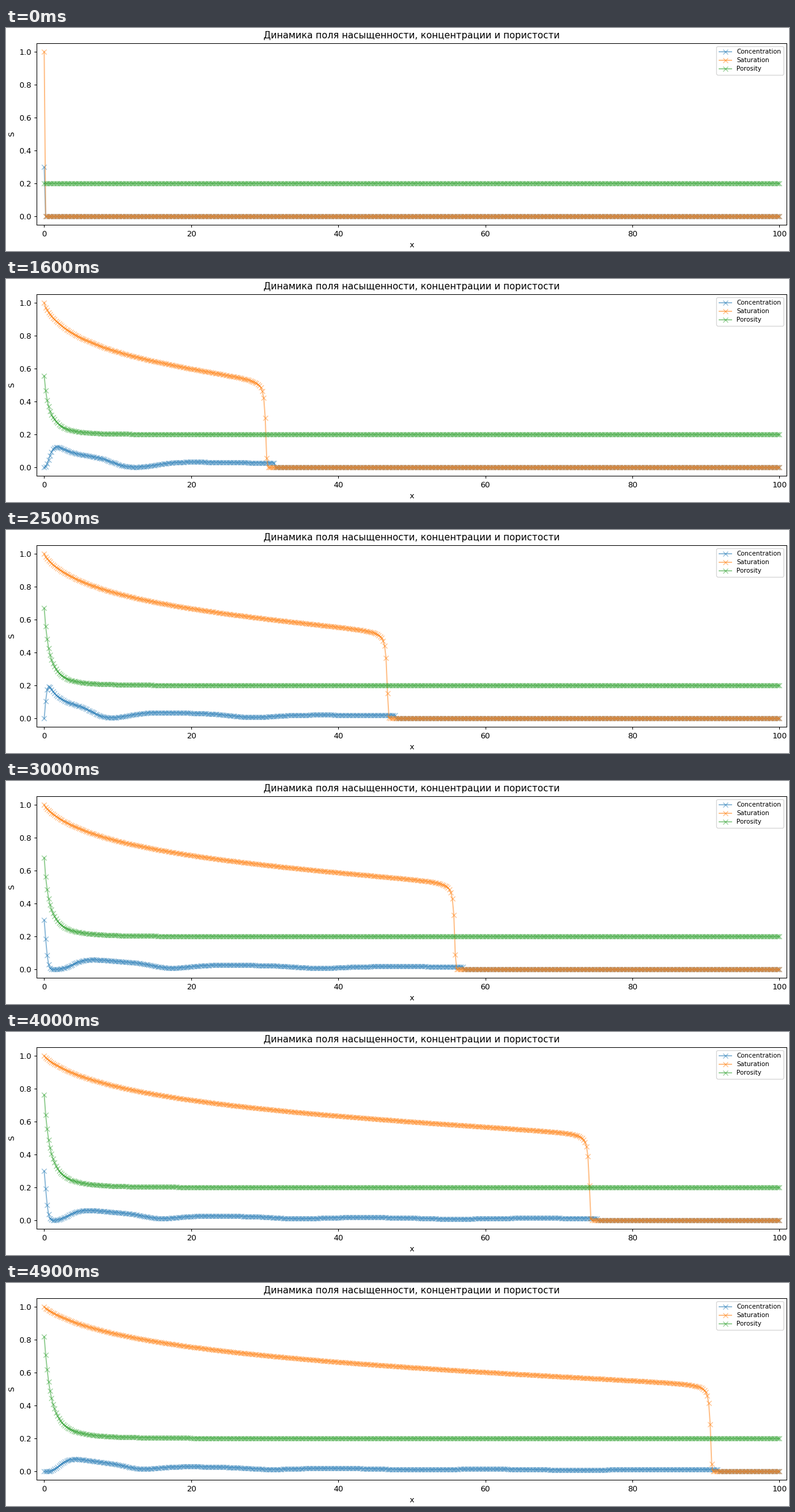
Write a matplotlib script that moves like this. It is 1280 by 366 pixels and loops after 5 s.

```python
import numpy as np
import matplotlib.pyplot as plt
from matplotlib.animation import FuncAnimation

W, H = 1280, 366
DPI = W / 14
FRAMES, INTERVAL = 50, 100

# 1D two-phase flow with a reactive tracer, solved by an upwind scheme
N = 500
SUB = 80                # solver steps per frame
LEAD = 12               # extra steps before the first moving frame
FLUX = 1.234            # injected volume per frame
PULSE = 4.95            # frames the tracer inlet stays on, then off
C_IN, PHI0 = 0.3, 0.2

x = np.linspace(0, 100, N)
dt = 1 / SUB
lam = FLUX * dt / (x[1] - x[0])


def frac_flow(s):
    water = s ** 2.45
    return water / (water + 0.26 * (1 - s) ** 2)


def step(n, s, c, phi):
    f = frac_flow(s)
    s[1:] += lam * (f[:-1] - f[1:])
    wet = s[1:] > 1e-250
    store = np.where(wet, s[1:] * phi[1:] / PHI0, 1)
    rate = np.where(wet, np.minimum(lam * f[:-1] / store, 1), 0)
    c[1:] += rate * (c[:-1] - c[1:])
    c -= dt * 4.8 * ((1 - phi) / (1 - PHI0)) ** 2 * c ** 2.3
    c[0] = C_IN if (n * dt // PULSE) % 2 == 0 else 0
    phi += dt * 0.0594 * (c / C_IN) ** 2.75 * (1 - phi)


def simulate():
    s, c, phi = np.zeros(N), np.zeros(N), np.full(N, PHI0)
    s[0], c[0] = 1, C_IN
    states = [(c.copy(), s.copy(), phi.copy())]
    n = 0
    for k in range(1, FRAMES):
        while n < SUB * k + LEAD:
            n += 1
            step(n, s, c, phi)
        states.append((c.copy(), s.copy(), phi.copy()))
    return states


states = simulate()

fig = plt.figure(figsize=((W + 0.01) / DPI, (H + 0.01) / DPI), dpi=DPI,
                 facecolor="white")
left, right, top, bottom = 50.4, 1276.4, 25, 323
ax = fig.add_axes([left / W, 1 - bottom / H, (right - left) / W, (bottom - top) / H])
ax.set(xlim=(-1, 101), ylim=(-0.05, 1.05), xlabel="x", ylabel="S")
ax.set_title("Динамика поля насыщенности, концентрации и пористости", fontsize=11.92)

names = ("Concentration", "Saturation", "Porosity")
lines = [ax.plot(x, y, marker="x", alpha=0.5, label=name)[0]
         for name, y in zip(names, states[0])]
ax.legend(loc="upper right", fontsize=8.08, labelspacing=0.4)


def update(k):
    for line, y in zip(lines, states[k]):
        line.set_ydata(y)
    return lines


anim = FuncAnimation(fig, update, frames=FRAMES, interval=INTERVAL,
                     repeat=True, repeat_delay=0)
plt.show()
```
